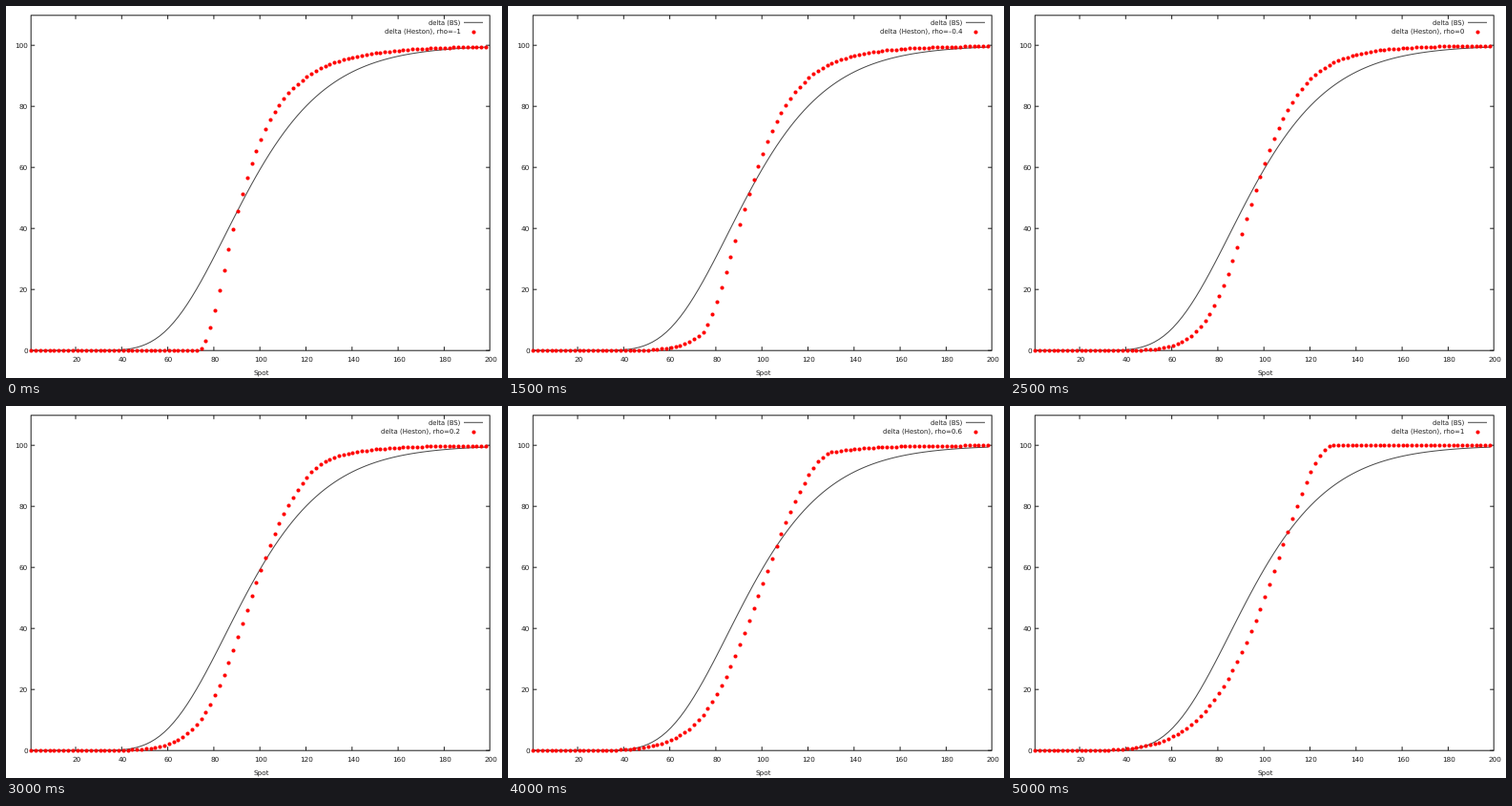
Write a matplotlib script that moves like this. It is 520 by 390 pixels and loops after 5.5 s.

```python
import math

import matplotlib.pyplot as plt
import numpy as np
from matplotlib.animation import FuncAnimation

plt.rcParams.update({"font.family": "DejaVu Sans", "text.hinting": "none"})

W, H, DPI = 520, 390, 100
PX = 72 / DPI  # points per pixel
LEFT, RIGHT, TOP, BOTTOM = 26.2, 507.2, 9.8, 361.2
STEPS = 11
FRAME = "#1c1c1c"
CURVE = "#484848"


def px(spot):
    return 24.7 + 2.415 * spot


def py(delta):
    return BOTTOM - 3.2 * delta


def logistic(u):
    return 100 / (1 + np.exp(-u))


def edge(ratio):
    """Log term that diverges where the ratio reaches one."""
    return np.log(np.maximum(1 - ratio**6, 1e-12))


def black_scholes(spot):
    d1 = np.log(spot / 100) / 0.3 + 0.235
    return np.array([50 * (1 + math.erf(d / math.sqrt(2))) for d in d1])


def heston(spot, rho):
    """Blend the uncorrelated delta with the fully correlated limit."""
    x = np.log(spot / 100)
    middle = logistic(0.43 + 9 * x)
    if rho < 0:
        limit = logistic(1.1 + 6.32 * x + 1.96 * edge(73 / spot))
    else:
        limit = logistic(-0.44 + 5.2 * x - 1.83 * edge(spot / 130))
    return middle + abs(rho) * (limit - middle)


fig = plt.figure(figsize=(W / DPI, H / DPI), dpi=DPI, facecolor="white")
ax = fig.add_axes([0, 0, 1, 1])
ax.set_xlim(0, W)
ax.set_ylim(H, 0)
ax.axis("off")


def line(x, y, color=FRAME, width=1.0):
    ax.plot(x, y, color=color, lw=width * PX, solid_capstyle="butt", snap=False)


def text(x, y, s, ha="center", size=7.3):
    return ax.text(x, y, s, ha=ha, va="baseline", fontsize=size * PX, color=FRAME)


def dots(x, y):
    return ax.plot(x, y, "o", color="#ff0000", ms=4.1 * PX, mew=0, zorder=3,
                   snap=False)[0]


line([LEFT, RIGHT, RIGHT, LEFT, LEFT], [BOTTOM, BOTTOM, TOP, TOP, BOTTOM])
for spot in range(20, 201, 20):
    x = px(spot)
    text(x + 1, 373, str(spot))
    if spot < 200:
        line([x, x], [BOTTOM, BOTTOM - 4])
        line([x, x], [TOP, TOP + 4])
for delta in range(0, 101, 20):
    y = py(delta)
    text(23, y + 2.8, str(delta), "right")
    line([LEFT, LEFT + 4], [y, y])
    line([RIGHT, RIGHT - 4], [y, y])
text(267.3, 386.3, "Spot")

spots = 0.7 + 1.994 * np.arange(100)
line(px(spots), py(black_scholes(spots)), CURVE)

text(476.5, 20, "delta (BS)", "right", 6.8)
line([480, 500], [17.3, 17.3], CURVE)
key = text(476.5, 29, "", "right", 7)
dots([489.8], [26.5])
marks = dots([], [])


def update(i):
    rho = 2 * i / (STEPS - 1) - 1
    marks.set_data(px(spots), py(heston(spots, rho)))
    value = f"{round(rho, 1):g}".replace("-", "\u2013")
    key.set_text(f"delta (Heston), rho={value}")
    return marks, key


anim = FuncAnimation(fig, update, frames=STEPS, interval=500, repeat=True,
                     repeat_delay=0, blit=False)
plt.show()
```
